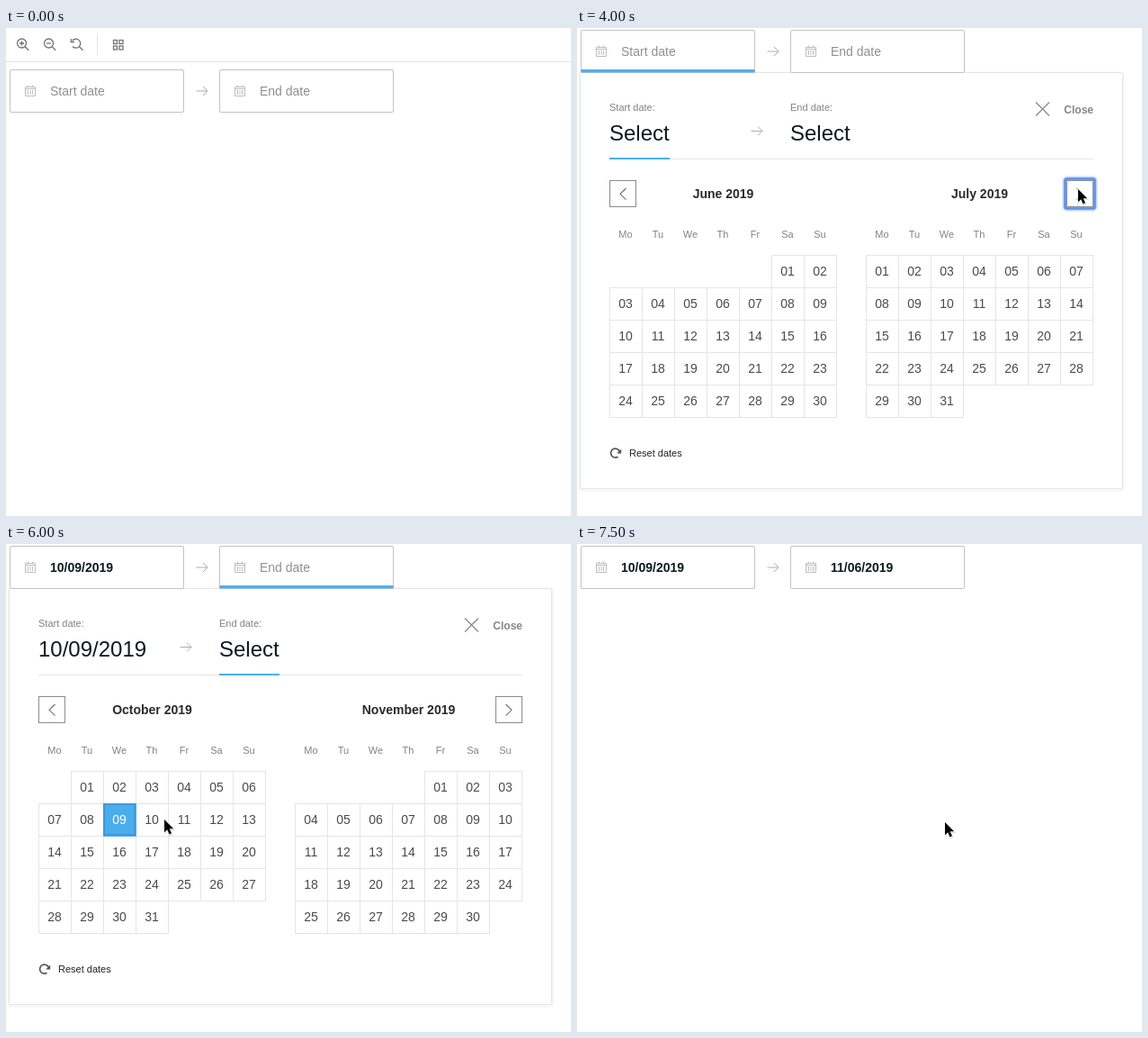
An HTML page that plays this animation: 628x542 px, repeating every 8000 ms.

```html
<!DOCTYPE html>
<html lang="en">
<head>
<meta charset="utf-8">
<title>Date range picker</title>
<style>
  html, body { margin: 0; width: 100%; height: 100%; overflow: hidden; background: #fff; }
  svg { display: block; width: 628px; height: 542px; font-family: "Liberation Sans", Arial, sans-serif; }
  rect, path, circle { fill: none; }
  .mid { text-anchor: middle; }
  .bold { font-weight: bold; }
  .hint { font-size: 14px; fill: #8f8f8f; }
  .value { font-size: 14px; fill: #0b1b20; font-weight: bold; }
  .label { font-size: 11px; fill: #828282; }
  .big { font-size: 24px; fill: #0c1b20; }
  .title { font-size: 14px; fill: #2b2b2b; font-weight: bold; }
  .day { font-size: 14px; fill: #4b4b4b; }
  .on { fill: #fff; }
  .close { font-size: 12px; fill: #868686; font-weight: bold; }
  .reset { font-size: 11px; fill: #222; }
  .line { stroke: #e5e5e5; }
  .tool { stroke: #737373; stroke-width: 1.3; }
  .thin { stroke: #adadad; }
  .nav { stroke: #8b8b8b; }
  .blue { fill: #4bb0ea; }
</style>
</head>
<body>
<svg id="stage" viewBox="0 0 628 542"></svg>
<script>
const LOOP = 8000;
const BLUE = '#4badeb', RANGE = '#84c6e9', FOCUS = '#3f98dd';
const WEEK = ['Mo', 'Tu', 'We', 'Th', 'Fr', 'Sa', 'Su'];
const NAMES = { 6: 'June', 7: 'July', 8: 'August', 9: 'September', 10: 'October', 11: 'November' };

// Each step adds to the state before it; dates are month * 100 + day.
const steps = [
  [0, { toolbar: true, month: 6 }],
  [500, { at: [324, 51] }],
  [750, { toolbar: false, at: [142, 54] }],
  [1000, { at: [105, 23] }],
  [2250, { open: true, fade: .93 }],
  [2500, { fade: 1 }],
  [3000, { at: [373, 93] }],
  [3250, { at: [514, 143] }],
  [3500, { at: [544, 166] }],
  [3750, { at: [557, 179] }],
  [4000, { ring: true }],
  [4250, { ring: false, month: 8 }],
  [4500, { ring: true }],
  [4750, { ring: false, month: 10 }],
  [5000, { at: [197, 266], hover: 1005 }],
  [5250, { at: [124, 300], hover: 1009 }],
  [5500, { focus: 1009 }],
  [5750, { start: 1009, hover: 0 }],
  [6000, { at: [176, 306] }],
  [6250, { at: [415, 313], hover: 1105, focus: 0 }],
  [6500, { at: [441, 310], hover: 1107 }],
  [7000, { at: [409, 309], hover: 1106 }],
  [7250, { focus: 1106 }],
  [7500, { open: false, end: 1106 }]
];

const pad = n => String(n).padStart(2, '0');
const format = key => `${pad(Math.floor(key / 100))}/${pad(key % 100)}/2019`;
const text = (x, y, cls, s) => `<text x="${x}" y="${y}" class="${cls}">${s}</text>`;
const path = (d, cls, more = '') => `<path d="${d}" class="${cls}" ${more}/>`;
const rect = (x, y, w, h, more) => `<rect x="${x}" y="${y}" width="${w}" height="${h}" ${more}/>`;
const arrow = (x, y) => path(`M${x} ${y}h12.5m-5 -5l5 5l-5 5`, 'thin');

function toolbar() {
  const lens = x => `<circle cx="${x}" cy="17" r="5" class="tool"/>` + path(`M${x + 3.7} 20.7l4 4`, 'tool');
  let out = lens(17.5) + path('M15 17h5M17.5 14.5v5', 'tool')
    + lens(47.5) + path('M45 17h5', 'tool')
    + path('M73.5 14.5A5 5 0 1 1 74 20.5M81.5 20.7l4 4M72.2 12v3.6h3.8', 'tool')
    + path('M101.5 6v24M0 37.5h628', 'line');
  for (const x of [119.5, 126])
    for (const y of [13.5, 20]) out += rect(x, y, 4, 4, 'class="tool"');
  return out;
}

function field(x, hint, key, active) {
  const icon = path(`M${x + 17.5} 21.5h11v10h-11zM${x + 20.5} 19.5v2m5 0v-2M${x + 17.5} 23.5h11`
    + `M${x + 20.5} 25v5m2.5 0v-5m2.5 0v5`, '', 'stroke="#aeaeae" stroke-width=".8"');
  return rect(x + .5, 2.5, 193, 47, 'rx="1.5" stroke="#c3c3c3" style="fill:#fff"') + icon
    + text(x + 45, 31, key ? 'value' : 'hint', key ? format(key) : hint)
    + (active ? rect(x + .5, 46, 193, 3.3, 'class="blue" style="fill:#4bb0ea"') : '');
}

function cell(x, y, key, s) {
  const first = key === s.start;
  const ranged = s.start && key > s.start && key <= s.hover;
  const fill = first ? BLUE : ranged ? RANGE : key === s.hover ? '#e5e7e8' : '#fff';
  const edge = first ? BLUE : ranged ? '#f4fafd' : '#e5e5e5';
  const box = rect(x + .5, y + .5, 36, 36, `stroke="${edge}" style="fill:${fill}"`);
  const focus = key === s.focus
    ? rect(x + 1, y + 1, 34, 34, `stroke="${FOCUS}" stroke-width="2"`) : '';
  const label = text(x + 18, y + 23, first || ranged ? 'day mid on' : 'day mid', pad(key % 100));
  return { rank: first || focus ? 2 : ranged ? 1 : 0, svg: box + focus + label };
}

function month(x, m, s) {
  const lead = (new Date(2019, m - 1, 1).getDay() + 6) % 7;
  const count = new Date(2019, m, 0).getDate();
  const cells = [];
  for (let i = lead; i < Math.min(35, lead + count); i++)
    cells.push(cell(x + i % 7 * 36, 252 + Math.floor(i / 7) * 36, m * 100 + i - lead + 1, s));
  cells.sort((a, b) => a.rank - b.rank);
  return text(x + 126.5, 189, 'title mid', `${NAMES[m]} 2019`)
    + WEEK.map((w, i) => text(x + 18 + i * 36, 233, 'label mid', w)).join('')
    + cells.map(c => c.svg).join('');
}

function panel(s) {
  const nav = x => rect(x + .5, 169.5, 29, 29, 'class="nav"');
  const ring = rect(542, 167, 34, 34, 'rx="3" stroke="#6fa2f0" stroke-width="5" opacity=".4"')
    + rect(542.5, 167.5, 33, 33, 'rx="2" stroke="#5b90e6" stroke-width="2.6"');
  return `<g opacity="${s.fade}">`
    + rect(2.5, 49.5, 605, 464, 'rx="3" stroke="#f5f5f5" stroke-width="2"')
    + rect(3.5, 49.5, 603, 462, 'rx="2" stroke="#e4e4e4" style="fill:#fff"')
    + text(36, 92, 'label', 'Start date:') + text(237, 92, 'label', 'End date:')
    + text(36, 125, 'big', s.start ? format(s.start) : 'Select') + text(237, 125, 'big', 'Select')
    + arrow(193.5, 114.5)
    + path('M510 82.5l15 15m0 -15l-15 15', '', 'stroke="#8a8a8a" stroke-width="1.3"')
    + text(541.3, 95, 'close', 'Close')
    + path('M36 145.5h538', 'line')
    + rect(s.start ? 237 : 36, 144, 67, 2, 'style="fill:#4bb0ea"')
    + month(36, s.month, s) + month(321, s.month + 1, s)
    + nav(36) + nav(544)
    + path('M54.5 178l-6.5 6.3l6.5 6.3M555.5 178l6.5 6.3l-6.5 6.3', '', 'stroke="#707070" stroke-width="1.1"')
    + (s.ring ? ring : '')
    + path('M45.5 476.2A5 5 0 1 1 47.3 470.5', '', 'stroke="#555" stroke-width="1.7"')
    + path('M49.2 467.5v5h-5z', '', 'style="fill:#555"')
    + text(58, 476, 'reset', 'Reset dates') + '</g>';
}

function cursor([x, y]) {
  const shape = 'M0 0V14.2L3.2 11.2L5.5 16.4L8 15.3L5.7 10.3H10.2Z';
  return `<g transform="translate(${x} ${y})">`
    + path(shape, '', 'transform="translate(.4 1)" stroke="#000" stroke-width="1.6" opacity=".13"')
    + path(shape, '', 'stroke="#fff" stroke-width="1.4" style="fill:#000" paint-order="stroke"') + '</g>';
}

function scene(s) {
  return (s.toolbar ? toolbar() : '')
    + (s.open ? panel(s) : '')
    + `<g transform="translate(0 ${s.toolbar ? 44 : 0})">`
    + field(4, 'Start date', s.start, s.open && !s.start)
    + field(237, 'End date', s.end, s.open && s.start)
    + arrow(211.5, 26) + '</g>'
    + (s.at ? cursor(s.at) : '');
}

const stage = document.getElementById('stage');
const began = performance.now();
let shown = 0;

function draw() {
  const t = (performance.now() - began) % LOOP;
  const past = steps.filter(([time]) => time <= t);
  if (past.length !== shown) {
    shown = past.length;
    stage.innerHTML = scene(Object.assign({}, ...past.map(step => step[1])));
  }
  requestAnimationFrame(draw);
}
draw();
</script>
</body>
</html>
```
